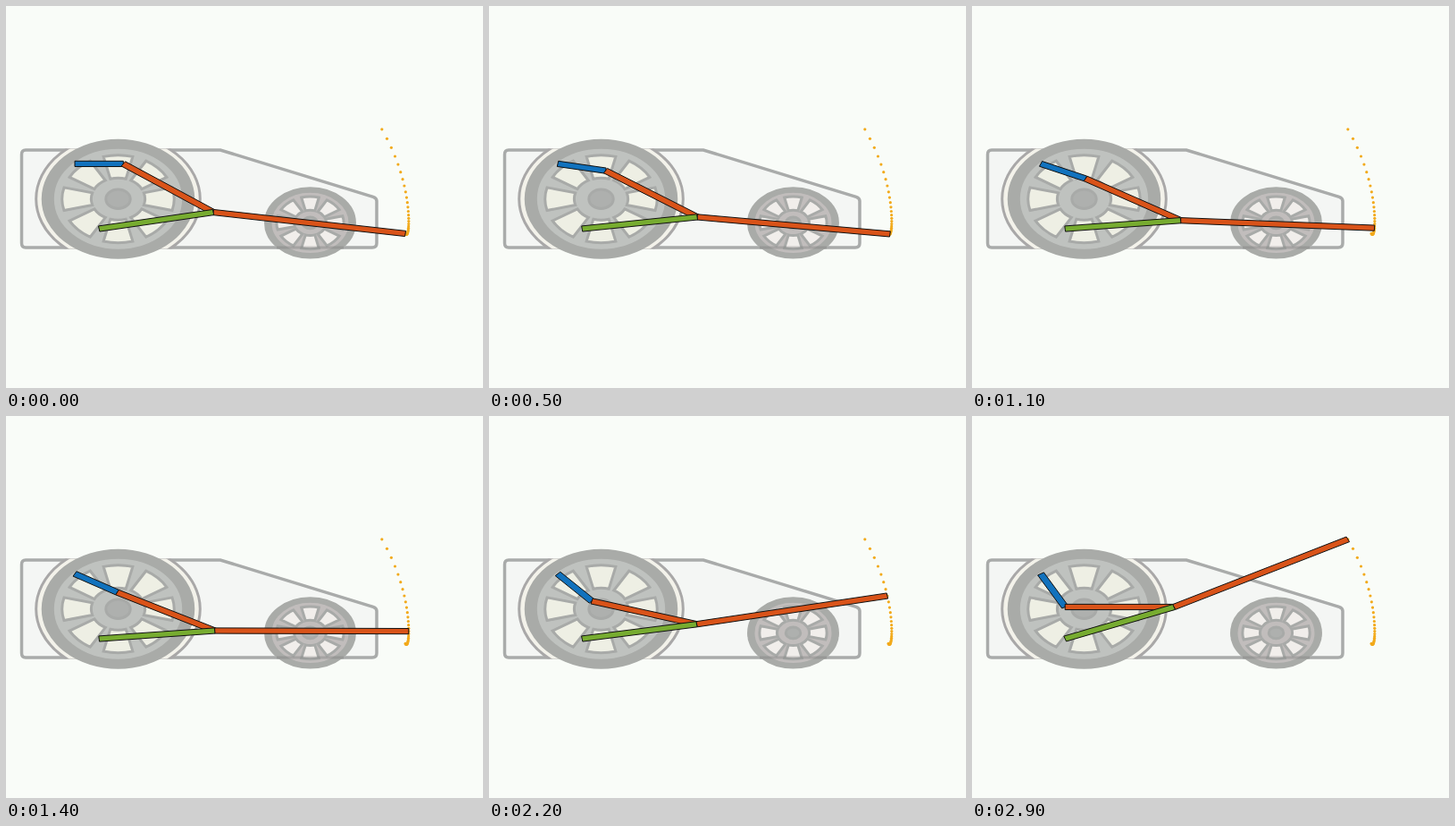
Recreate the animation shown at these times as an HTML page. Size 534 by 427 pixels, loop 3000 ms.

```html
<!DOCTYPE html>
<html lang="en">
<head>
<meta charset="utf-8">
<title>Four-bar linkage</title>
<style>
html, body { margin: 0; height: 100%; overflow: hidden; background: #f9fcf8; }
svg { display: block; }
#links path { stroke: #111; stroke-width: 1; vector-effect: non-scaling-stroke; }
#slot, #hub { stroke: #a8aaa8; stroke-width: 3; vector-effect: non-scaling-stroke; }
</style>
</head>
<body>
<svg width="534" height="427" viewBox="0 0 534 427">
  <defs>
    <clipPath id="arch"><rect x="20" y="159.5" width="220" height="112"/></clipPath>
    <path id="slot" d="M-6.8-22.500L-12.800-47.300A49 49 0 0 1 12.800-47.300L6.800-22.500A23.500 23.500 0 0 0-6.800-22.500Z"/>
    <g id="pair"><use href="#slot"/><use href="#slot" transform="rotate(180)"/></g>
    <circle id="hub" r="10.700" fill="#aeb0ae"/>
  </defs>
  <path d="M22 161H240L411 213.300Q415 214.500 415 218V265Q415 270 410 270H22Q17.500 270 17.500 265V166Q17.500 161 22 161Z" fill="#f4f6f4" stroke="#a9abaa" stroke-width="3.500"/>
  <g clip-path="url(#arch)">
    <ellipse cx="125.500" cy="215.700" rx="91.800" ry="71.500" fill="#f3f2ea" stroke="#a9a8a8" stroke-width="3"/>
  </g>
  <g id="wheels"></g>
  <path d="M303 270H378" stroke="#777" stroke-width="3" opacity="0.35"/>
  <g id="trace" fill="#f2aa1c"></g>
  <g id="links"></g>
</svg>
<script>
const FRAMES = 30, STEP = 100;
const ORIGIN = [77, 176.4], SX = 1.27;
const CRANK = 42.8, COUPLER = 96, ROCKER = 102.35, ARM = 171, BEND = 0.459;
const A = [0, 0], D = [21.4, 72.6];
const $ = id => document.getElementById(id);

function add(parent, tag, attrs) {
  const el = document.createElementNS("http://www.w3.org/2000/svg", tag);
  for (const k in attrs) el.setAttribute(k, attrs[k]);
  return parent.appendChild(el);
}

function addWheel(x, y, size, disc, slot) {
  const g = add($("wheels"), "g", { transform: `translate(${x} ${y}) scale(${1.28 * size} ${size})` });
  add(g, "circle", { r: 61.5, fill: disc, stroke: "#a9aba8", "stroke-width": 11 });
  for (let a = 0; a < 180; a += 45) add(g, "use", { href: "#pair", fill: slot, transform: `rotate(${a})` });
  add(g, "use", { href: "#hub" });
}
addWheel(125.5, 215.7, 1, "#bfc2bf", "#eeefe4");
addWheel(340.5, 242.4, 0.6, "#c1bdbc", "#f1eeeb");

const polar = ([x, y], r, a) => [x + r * Math.cos(a), y + r * Math.sin(a)];

// Joint positions for one step of the crank's 60 degree sweep.
function solve(i) {
  const B = polar(A, CRANK, i / (FRAMES - 1) * Math.PI / 3);
  const dx = D[0] - B[0], dy = D[1] - B[1], d = Math.hypot(dx, dy);
  const a = Math.atan2(dy, dx) - Math.acos((COUPLER ** 2 + d * d - ROCKER ** 2) / (2 * COUPLER * d));
  const C = polar(B, COUPLER, a);
  return { B, C, P: polar(C, ARM, a - BEND) };
}

function bar([x1, y1], [x2, y2]) {
  const len = Math.hypot(x2 - x1, y2 - y1);
  const nx = (y1 - y2) / len * 3.1, ny = (x2 - x1) / len * 3.1;
  return `M${x1 + nx} ${y1 + ny}L${x2 + nx} ${y2 + ny}L${x2 - nx} ${y2 - ny}L${x1 - nx} ${y1 - ny}Z`;
}

const poses = Array.from({ length: FRAMES }, (_, i) => solve(i));
for (const { P } of poses) {
  add($("trace"), "circle", { cx: ORIGIN[0] + P[0] * SX, cy: ORIGIN[1] + P[1], r: 1.6 });
}

$("links").setAttribute("transform", `translate(${ORIGIN}) scale(${SX} 1)`);
const bars = ["#1272bd", "#d95319", "#d95319", "#77ac30"].map(fill => add($("links"), "path", { fill }));

function draw(now) {
  const { B, C, P } = poses[Math.floor(now / STEP) % FRAMES];
  [[A, B], [B, C], [C, P], [D, C]].forEach(([p, q], i) => bars[i].setAttribute("d", bar(p, q)));
  requestAnimationFrame(draw);
}
draw(performance.now());
</script>
</body>
</html>
```
